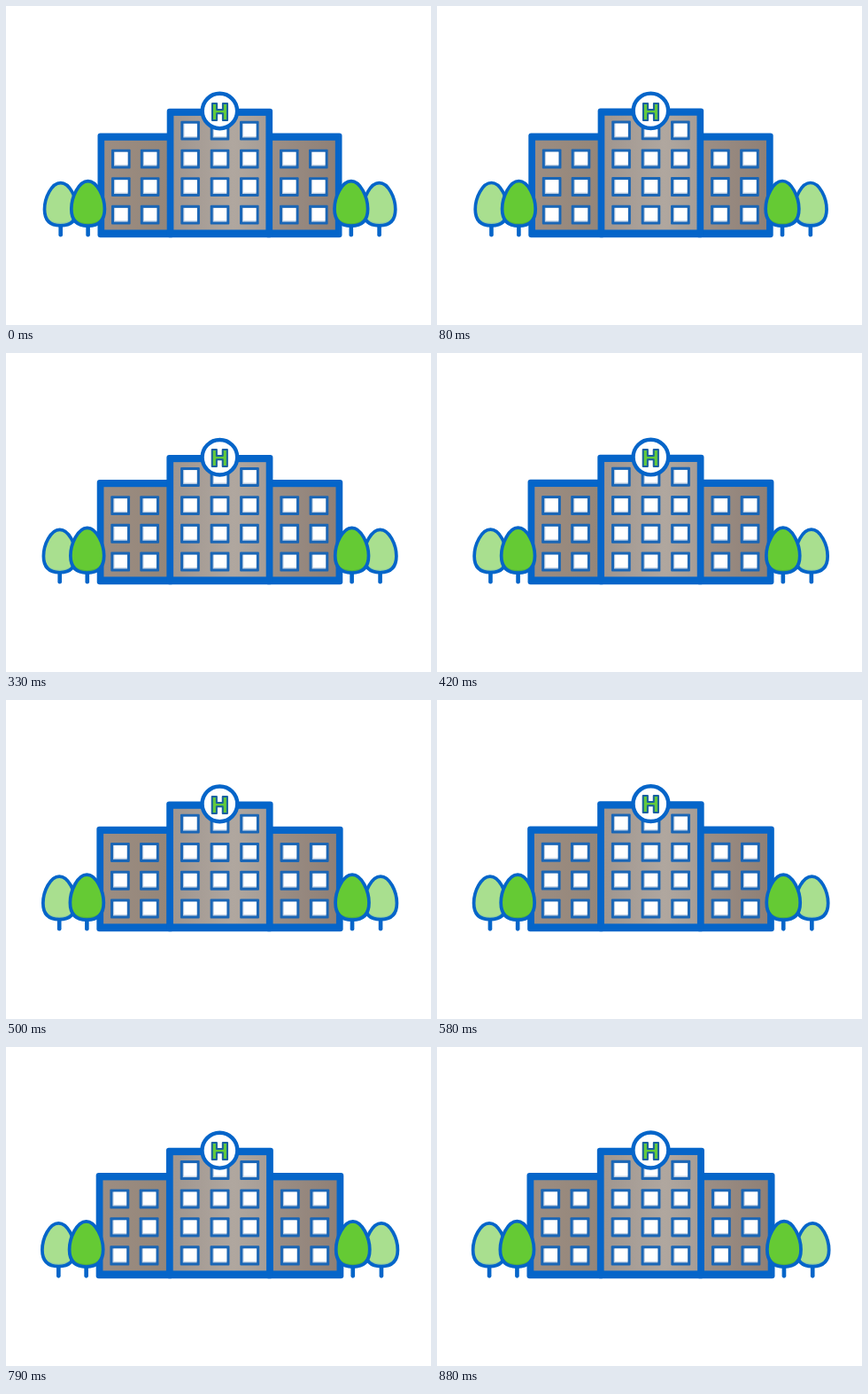
An HTML page that plays this animation: 480 px wide and 360 px high, repeating every 0.92 s.

```html
<!DOCTYPE html>
<html lang="en">
<head>
<meta charset="utf-8">
<title>Hospital</title>
<style>
  html, body { margin: 0; width: 100%; height: 100%; overflow: hidden; background: #fff; }
  svg { display: block; width: 100vw; height: 100vh; }
  text { font: 900 26px Inter, sans-serif; text-anchor: middle; }
</style>
</head>
<body>
<svg viewBox="0 0 480 360">
  <defs>
    <linearGradient id="left"><stop stop-color="#9c8d82"/><stop offset="1" stop-color="#948679"/></linearGradient>
    <linearGradient id="main"><stop stop-color="#a0968f"/><stop offset=".65" stop-color="#b0a79f"/><stop offset="1" stop-color="#a69d96"/></linearGradient>
    <linearGradient id="right"><stop stop-color="#9c8f86"/><stop offset="1" stop-color="#8f8076"/></linearGradient>
  </defs>
  <g id="scene"></g>
</svg>
<script>
const BLUE = '#0565c9';
const LOOP = 920, STEPS = 22, GROWTH = 0.0145;
const CX = 241.5, CY = 258;
const scene = document.getElementById('scene');

function add(tag, attrs, text) {
  const el = document.createElementNS('http://www.w3.org/2000/svg', tag);
  for (const key in attrs) el.setAttribute(key, attrs[key]);
  if (text) el.textContent = text;
  scene.appendChild(el);
}

function rect(x, y, width, height, fill, rx = 0) {
  add('rect', { x, y, width, height, fill, rx });
}

function wall(x, y, w, fill) {
  const h = 261.3 - y;
  rect(x, y, w, h, BLUE, 3);
  rect(x + 7.7, y + 8.2, w - 15.4, h - 17, `url(#${fill})`);
}

function pane(x, y) {
  rect(x, y, 21.6, 21.8, '#1a66b6', 1);
  rect(x + 3, y + 3, 15.6, 15.8, '#c3d2e4');
  rect(x + 4.2, y + 3.2, 14.2, 14.2, '#fff');
}

function panes(cols, rows) {
  for (const y of rows) for (const x of cols) pane(x, y);
}

function tree(x, top, bottom, r, fill, shade) {
  const wide = top + (bottom - top) * 0.62;
  const egg = (w, low) =>
    `M${x} ${top}C${x + w * 0.56} ${top} ${x + w} ${wide - 13} ${x + w} ${wide}` +
    `C${x + w} ${low - 5} ${x + w * 0.6} ${low} ${x} ${low}` +
    `S${x - w} ${low - 5} ${x - w} ${wide}` +
    `C${x - w} ${wide - 13} ${x - w * 0.56} ${top} ${x} ${top}Z`;
  add('path', { d: `M${x} ${bottom}V258.3`, stroke: BLUE, 'stroke-width': 4.6, 'stroke-linecap': 'round' });
  add('path', { d: egg(r, bottom), fill: shade });
  add('path', { d: egg(r - 1, bottom - 3), fill });
  add('path', { d: egg(r, bottom), fill: 'none', stroke: BLUE, 'stroke-width': 3.7 });
}

function build() {
  const rows = [161.7, 193.2, 224.8];
  wall(103.5, 143.6, 86.5, 'left');
  wall(292.5, 143.6, 87, 'right');
  wall(181.7, 115.7, 119.4, 'main');
  panes([119, 151.8], rows);
  panes([197.3, 230.7, 264], [129.7, ...rows]);
  panes([309, 342], rows);

  add('circle', { cx: 241.4, cy: 118.5, r: 19.7, fill: '#fff', stroke: BLUE, 'stroke-width': 4.4 });
  add('text', {
    x: 241.4, y: 128.7, fill: '#62ca3c', stroke: '#17609f',
    'stroke-width': 2, 'stroke-linejoin': 'round'
  }, 'H');

  for (const x of [61.7, 421.6])
    tree(x, 199.6, 247.8, 18.2, '#a9df8f', '#8dc9a0');
  for (const x of [92.6, 389.8])
    tree(x, 197.6, 248.2, 18.8, '#65ca34', '#4fb043');
}

// Holds each zoom step on a 10 ms clock.
function draw(now) {
  const ticks = Math.floor((now % LOOP) / 10);
  const step = Math.floor((ticks + 0.6) * 10 * STEPS / LOOP);
  const scale = 1 + GROWTH * step / (STEPS - 1);
  scene.setAttribute('transform', `translate(${CX} ${CY}) scale(${scale}) translate(${-CX} ${-CY})`);
}

build();
const start = performance.now();
function loop() {
  draw(performance.now() - start);
  requestAnimationFrame(loop);
}
loop();
</script>
</body>
</html>
```
